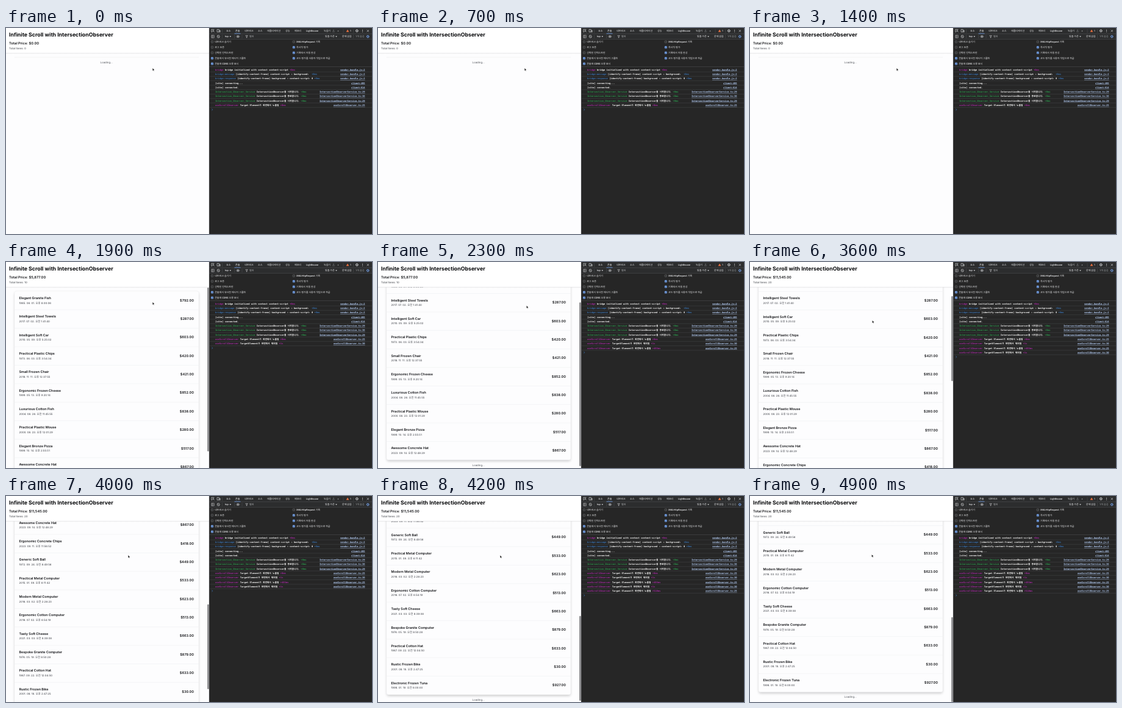
These frames come from a looping animation (600x338 px, 5 s). An HTML page:

```html
<!DOCTYPE html>
<html>
<head>
<meta charset="utf-8">
<style>
html, body { margin: 0; width: 100%; height: 100%; overflow: hidden; background: #fff; }
svg { display: block; width: 600px; height: 338px; }
text { white-space: pre; text-rendering: geometricPrecision; font-family: Inter, "Noto Sans CJK KR", "Noto Sans CJK", sans-serif; }
.mono { font: 3.76px "DejaVu Sans Mono", "Noto Sans CJK KR", "Noto Sans CJK", monospace; }
.strong { font-weight: 700; }
.ui { font: 500 4px Roboto, "Noto Sans CJK KR", "Noto Sans CJK", sans-serif; }
</style>
</head>
<body>
<svg id="stage" viewBox="0 0 600 338" xmlns="http://www.w3.org/2000/svg">
  <defs>
    <filter id="soft" x="-10%" y="-10%" width="120%" height="120%"><feGaussianBlur stdDeviation="2"/></filter>
    <linearGradient id="under" x1="0" y1="0" x2="0" y2="1">
      <stop offset="0" stop-color="#000" stop-opacity=".06"/>
      <stop offset="1" stop-color="#000" stop-opacity="0"/>
    </linearGradient>
    <clipPath id="page"><rect width="333" height="338"/></clipPath>
  </defs>
</svg>
<script>
const LOOP = 5000, ROW = 30.35, TOP = 48;
const stage = document.getElementById('stage');

function el(parent, tag, attrs, text) {
  const node = document.createElementNS('http://www.w3.org/2000/svg', tag);
  for (const key in attrs) node.setAttribute(key, attrs[key]);
  if (text !== undefined) node.textContent = text;
  parent.appendChild(node);
  return node;
}
const rect = (g, x, y, width, height, fill, more) => el(g, 'rect', { x, y, width, height, fill, ...more });
const path = (g, d, stroke, more) => el(g, 'path', { d, stroke, fill: 'none', 'stroke-width': .6, ...more });
const text = (g, x, y, size, weight, fill, str, more) =>
  el(g, 'text', { x, y, 'font-size': size, 'font-weight': weight, fill, ...more }, str);

// Shopping list
const items = [
  ['Elegant Granite Fish', '1985. 06. 01. 오후 8:00:06', 792],
  ['Intelligent Steel Towels', '2017. 07. 02. 오전 1:41:40', 287],
  ['Intelligent Soft Car', '2010. 05. 09. 오후 5:25:02', 603],
  ['Practical Plastic Chips', '1973. 06. 03. 오후 3:54:34', 420],
  ['Small Frozen Chair', '2018. 11. 11. 오후 12:37:55', 421],
  ['Ergonomic Frozen Cheese', '1999. 05. 13. 오후 9:20:14', 852],
  ['Luxurious Cotton Fish', '2004. 08. 26. 오전 11:45:55', 838],
  ['Practical Plastic Mouse', '2000. 08. 23. 오후 12:01:29', 280],
  ['Elegant Bronze Pizza', '1999. 10. 14. 오후 2:55:51', 517],
  ['Awesome Concrete Hat', '2023. 09. 14. 오후 12:48:29', 867],
  ['Ergonomic Concrete Chips', '2023. 09. 11. 오후 11:56:52', 418],
  ['Generic Soft Ball', '1972. 09. 24. 오전 8:49:56', 449],
  ['Practical Metal Computer', '2015. 01. 09. 오후 6:11:42', 533],
  ['Modern Metal Computer', '2016. 03. 02. 오전 2:26:23', 623],
  ['Ergonomic Cotton Computer', '2016. 07. 02. 오후 6:54:19', 513],
  ['Tasty Soft Cheese', '2021. 03. 03. 오전 8:39:08', 663],
  ['Bespoke Granite Computer', '1976. 05. 19. 오전 8:50:28', 879],
  ['Practical Cotton Hat', '1987. 09. 22. 오전 12:04:50', 633],
  ['Rustic Frozen Bike', '2001. 08. 18. 오후 2:47:25', 30],
  ['Electronic Frozen Tuna', '1998. 01. 19. 오전 6:00:00', 927]
];
const INK = '#101114', DIM = '#383b42';

const page = el(stage, 'g', { 'clip-path': 'url(#page)' });
rect(page, 0, 0, 333, 338, '#fdfdfe');
const list = el(page, 'g', {});
const shadow = rect(list, 14.5, TOP + 2, 301, 0, '#000', { rx: 3, opacity: .2, filter: 'url(#soft)' });
const card = rect(list, 14, TOP, 302, 0, '#fdfdfe', { rx: 3, stroke: '#ececef', 'stroke-width': .4 });
const rows = items.map(([name, date, price], i) => {
  const y = TOP + i * ROW, g = el(list, 'g', {});
  if (i) path(g, `M14 ${y}H316`, '#e6e7eb', { 'stroke-width': .4 });
  text(g, 21.5, y + 13, 5.43, 600, INK, name);
  text(g, 21.5, y + 20.5, 4.39, 400, DIM, date);
  text(g, 308, y + 16.7, 5.6, 600, INK, `$${price}.00`, { 'text-anchor': 'end' });
  return g;
});
const loading = text(list, 164.7, 0, 4.39, 400, '#4d5057', 'Loading...', { 'text-anchor': 'middle' });

rect(page, 0, 0, 333, 41, '#fff');
rect(page, 0, 41, 333, 2, 'url(#under)');
path(page, 'M0 41.2H333', '#dcdde0', { 'stroke-width': .5 });
text(page, 5, 14.1, 8.78, 700, '#08090b', 'Infinite Scroll with IntersectionObserver');
const total = text(page, 5, 27.4, 5.72, 600, INK, '');
const count = text(page, 5, 35, 4.39, 400, DIM, '');
const thumb = rect(page, 330.2, 42, 2.4, 0, '#7e7e80', { rx: 1.2 });

// Developer tools
const dev = el(stage, 'g', {});
const LIGHT = '#e6e7e9', GREY = '#9a9da1', BLUE = '#7cacf8', EDGE = '#4b4c4e';
const ui = (x, y, str, fill = LIGHT, more) => el(dev, 'text', { x, y: y + 1.45, fill, class: 'ui', ...more }, str);
const line = (d, stroke = EDGE) => path(dev, d, stroke);
rect(dev, 333, 0, 267, 338, '#262626');
rect(dev, 333, 0, 267, 18.5, '#2c2d2e');
path(dev, 'M333.3 0V338', '#4a4b4d');
['M333 9.5H600', 'M333 18.5H600', 'M333 63.5H600', 'M354.5 2V8M354.5 11V17M374.5 11V17M387 11V17M569.5 11V17M553 2V8M569.5 2V8']
  .forEach(d => line(d));

path(dev, 'M341 3.2V2.4H336.8V6.6H338M339 4.2L341.5 6.8M339 4.2V6.2M339 4.2H341', LIGHT);
path(dev, 'M346 2.4H349.2V6.6H346ZM349.8 3.8H351.2V6.6H349.8Z', LIGHT);
[['요소', 361], ['콘솔', 376], ['네트워크', 391], ['소스', 413], ['애플리케이션', 428], ['성능', 458],
 ['메모리', 473], ['Lighthouse', 492], ['녹음기', 521]].forEach(([s, x]) => ui(x, 4.6, s, s === '콘솔' ? '#fff' : LIGHT));
path(dev, 'M374.5 9.2H384.5', BLUE, { 'stroke-width': .8 });
path(dev, 'M536.2 3.2H537.8M536.5 3.2V4.4L535.6 6.4H538.4L537.5 4.4V3.2', GREY, { 'stroke-width': .35 });
ui(543.5, 4.4, '»');
el(dev, 'path', { d: 'M560 2.4L562.4 6.6H557.6Z', fill: '#e8703f' });
ui(563.8, 4.6, '1');

function gear(x, y, color) {
  el(dev, 'circle', { cx: x, cy: y, r: 1.5, fill: 'none', stroke: color, 'stroke-width': .9 });
  el(dev, 'circle', { cx: x, cy: y, r: 2.2, fill: 'none', stroke: color, 'stroke-width': .6, 'stroke-dasharray': '.86 .87' });
}
gear(575.3, 4.6, LIGHT);
[2.9, 4.6, 6.3].forEach(cy => el(dev, 'circle', { cx: 584.5, cy, r: .5, fill: LIGHT }));
path(dev, 'M591.6 3L595 6.4M595 3L591.6 6.4', LIGHT);

path(dev, 'M336.8 11.9H341.2V16.1H336.8ZM338.3 11.9V16.1M339.3 14H340.5', LIGHT, { 'stroke-width': .5 });
el(dev, 'circle', { cx: 348.2, cy: 14, r: 2.1, fill: 'none', stroke: LIGHT, 'stroke-width': .6 });
path(dev, 'M346.8 12.5L349.6 15.5', LIGHT);
ui(359, 14, 'top');
ui(523, 14, '맞춤 수준');
ui(551, 14, '문제 없음');
ui(573, 14, '1개 숨김', GREY);
[367.8, 541.5].forEach(x => el(dev, 'path', { d: `M${x - 1.3} 13.3H${x + 1.3}L${x} 15Z`, fill: LIGHT }));
path(dev, 'M377.4 14Q380.3 10.6 383.2 14Q380.3 17.4 377.4 14Z', LIGHT, { 'stroke-width': .5 });
el(dev, 'circle', { cx: 380.3, cy: 14, r: .9, fill: LIGHT });
path(dev, 'M392.8 12.4H396.4L395 14.2V16H394.2V14.2Z', LIGHT, { 'stroke-width': .5 });
ui(399, 14, '필터', '#b9bbbe');
gear(593.2, 14, BLUE);

function option(x, y, label, on) {
  rect(dev, x - 1.7, y - 1.7, 3.4, 3.4, on ? BLUE : '#303132', { rx: .5, stroke: on ? BLUE : '#8a8c8f', 'stroke-width': .4 });
  if (on) path(dev, `M${x - 1} ${y}L${x - .2} ${y + .9}L${x + 1.1} ${y - .9}`, '#1d2a3d');
  ui(x + 4.2, y, label);
}
['네트워크 숨기기', '로그 보존', '선택된 컨텍스트만', '콘솔에서 유사한 메시지 그룹화', '콘솔에 CORS 오류 표시']
  .forEach((s, i) => option(338, 22.6 + 9 * i, s, i > 2));
['XMLHttpRequest 기록', '즉시적 평가', '기록에서 자동 완성', '코드 평가를 사용자 작업으로 취급']
  .forEach((s, i) => option(471.8, 22.6 + 9 * i, s, i > 0));

// Console output: [time, colour, tag, message, delta, link]
const PINK = '#d62bd0', SKY = '#3f8ae0', GREEN = '#2fc25a', WHITE = '#f4f4f4';
const service = (verb, n) =>
  [0, GREEN, 'Intersection_Observer_Service', ` IntersectionObserver를 ${verb}합니다. `, '+0ms', 'IntersectionObserverService.ts:' + n];
const watch = (at, shown, delta) => [at, PINK, 'useScrollObserver',
  shown ? ' Target Element가 화면에서 노출됨 ' : ' TargetElement가 화면에서 제외됨 ', delta, 'useScrollObserver.ts:' + (shown ? 25 : 30)];
const LOAD1 = 1700, LOAD2 = 3500;
const logs = [
  [0, PINK, 'bridge', ' bridge initialized with context content-script ', '+0ms', 'vendor.bundle.js:2'],
  [0, SKY, 'bridge:message', ' [identify-content-frame] content-script → background:  ', '+0ms', 'vendor.bundle.js:2'],
  [0, SKY, 'bridge:response', ' [identify-content-frame] background → content-script: 0 ', '+0ms', 'vendor.bundle.js:2'],
  [0, WHITE, '', '[vite] connecting...', '', 'client:495'],
  [0, WHITE, '', '[vite] connected.', '', 'client:614'],
  service('시작', 29), service('종료', 36), service('시작', 29),
  watch(0, true, '+0ms'),
  watch(LOAD1, false, '+1s'),
  watch(2110, true, '+403ms'),
  watch(LOAD2, false, '+1s'),
  watch(4110, true, '+518ms')
];
const logY = i => 68.4 + 7.28 * i;
const logRows = logs.map(([, color, tag, msg, delta, link], i) => {
  const g = el(dev, 'g', {}), y = logY(i) + 1.3;
  const t = el(g, 'text', { x: 343, y, class: 'mono' });
  el(t, 'tspan', { fill: color }, tag);
  el(t, 'tspan', { fill: WHITE, class: 'strong' }, msg);
  el(t, 'tspan', { fill: color }, delta);
  el(g, 'text', { x: 588.6, y, class: 'mono strong', fill: '#b4cdf5', 'text-anchor': 'end', 'text-decoration': 'underline' }, link);
  path(g, `M333.5 ${logY(i) + 3.64}H600`, '#454648', { 'stroke-width': .5 });
  return g;
});
const prompt = path(dev, 'M337.4 -1.3L338.8 0L337.4 1.3', SKY);

const cursor = el(stage, 'path', {
  d: 'M0 0V4.4L1 3.5L1.7 5L2.4 4.7L1.7 3.2H3.1Z', fill: '#000', stroke: '#fff', 'stroke-width': .35
});

// Motion
const clamp = (t, a, b) => Math.min(1, Math.max(0, (t - a) / (b - a)));
const easeOut = (t, a, b, power) => 1 - Math.pow(1 - clamp(t, a, b), power);
const smooth = (t, a, b) => { const p = clamp(t, a, b); return p * p * (3 - 2 * p); };
const show = (node, on) => node.setAttribute('display', on ? 'inline' : 'none');

function draw(t) {
  const n = t < LOAD1 ? 0 : t < LOAD2 ? 10 : 20;
  const scroll = 30 * easeOut(t, 2000, 2500, 2.4) + 303.3 * easeOut(t, 3700, 4400, 3.4);
  const height = n * ROW, sum = items.slice(0, n).reduce((s, item) => s + item[2], 0);

  list.setAttribute('transform', `translate(0 ${-scroll})`);
  card.setAttribute('height', Math.max(.1, height));
  shadow.setAttribute('height', height);
  rows.forEach((row, i) => show(row, i < n));
  loading.setAttribute('y', TOP + height + 9.8);
  total.textContent = `Total Price: $${sum.toLocaleString('en-US')}.00`;
  count.textContent = `Total Items: ${n}`;

  const view = 296, ratio = view / (n === 20 ? 629.3 : 326);
  show(thumb, n > 0);
  thumb.setAttribute('y', 42 + scroll * ratio);
  thumb.setAttribute('height', view * ratio);

  let lines = 0;
  logs.forEach((log, i) => {
    const on = t >= log[0];
    show(logRows[i], on);
    lines += on;
  });
  prompt.setAttribute('transform', `translate(0 ${logY(lines)})`);

  const a = smooth(t, 1950, 2280), b = smooth(t, 2700, 3350), c = smooth(t, 3700, 4100), d = smooth(t, 4250, 4600);
  const x = 240.3 + 3.2 * a - 43 * b - .3 * c - .7 * d;
  const y = 65.8 + 5.8 * a + 24.2 * b + 1.4 * c - 1.3 * d;
  cursor.setAttribute('transform', `translate(${x} ${y})`);
}

function tick() {
  draw(performance.now() % LOOP);
  requestAnimationFrame(tick);
}
tick();
</script>
</body>
</html>
```
